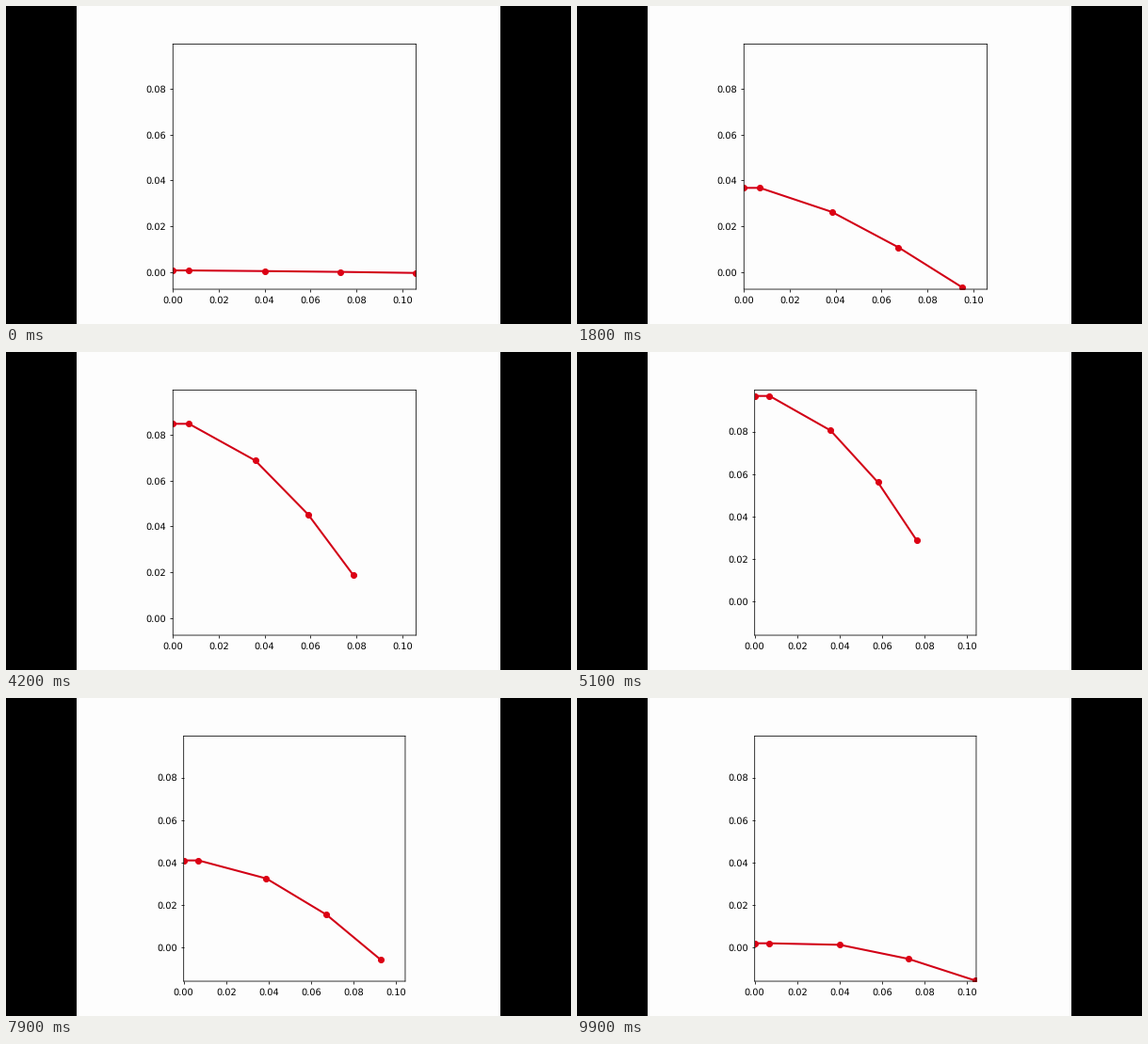
These frames come from a looping animation (600x338 px, 10000 ms). A matplotlib script:

```python
import numpy as np
import matplotlib.pyplot as plt
from matplotlib.animation import FuncAnimation
from matplotlib.patches import Rectangle
from matplotlib.ticker import MultipleLocator

W, H, DPI = 600, 338, 64
FRAMES, INTERVAL = 100, 100
HALF = FRAMES // 2
PAPER, LINE, DOT = "#fdfdfd", "#d20016", "#dc0014"

SCALE = H / 480                  # a 640 x 480 plot shrunk to the stage height
PT = SCALE * 100 / DPI           # point sizes after shrinking
MARGIN = 75                      # black bar on either side

BASE, LINK = 0.007, 0.033        # clamp length and link length
# A pose is the clamp height followed by the downward slope of each link.
PEAK = np.array([0.0988, 29.8, 47.6, 56.1])
START = np.array([0.0007, 0.5, 0.6, 0.8])
END = np.array([0, 0.6, 10.7, 17.0])
LIFT_BOW = np.array([0, 1.03, 0.90, 0.83])
DROP_BOW = np.array([-0.025, 0.33, 0.61, 0.75])


def blend(low, x, bow, skew):
    """Pose between low and PEAK, bowed away from a straight ramp."""
    ease = x + bow * x * (1 - x) * (1 + skew * (x - 0.5))
    return low + (PEAK - low) * ease


def chain(pose):
    height, angles = pose[0], np.radians(pose[1:])
    x = BASE + LINK * np.cumsum(np.cos(angles))
    y = height - LINK * np.cumsum(np.sin(angles))
    return np.r_[0, BASE, x], np.r_[height, height, y]


plt.rcParams.update({
    "font.family": "DejaVu Sans",
    "font.size": 10 * PT,
    "axes.linewidth": 0.8 * PT,
    "text.hinting": "none",
    "path.snap": False,
})

fig = plt.figure(figsize=(W / DPI, H / DPI), dpi=DPI, facecolor="black")
fig.add_artist(Rectangle((MARGIN / W, 0), 1 - 2 * MARGIN / W, 1,
                         color=PAPER, lw=0, zorder=-1))

ax = fig.add_axes([(MARGIN + 80.5 * SCALE) / W, 52.5 / 480,
                   496 * SCALE / W, 370 / 480], facecolor=PAPER)
ax.set_aspect("equal")
for axis in (ax.xaxis, ax.yaxis):
    axis.set_major_locator(MultipleLocator(0.02))
ax.tick_params(width=0.8 * PT, length=3.5 * PT, pad=3.5 * PT)
line, = ax.plot([], [], "o-", color=LINE, lw=2.1 * PT,
                ms=6.2 * PT, mew=PT, mfc=DOT, mec=DOT)


def update(i):
    if i < HALF:
        pose = blend(START, i / (HALF - 1), LIFT_BOW, -0.25)
        right, bottom = 0.106, -0.0075
    else:
        pose = blend(END, (FRAMES - i) / HALF, DROP_BOW, 1.43)
        right, bottom = 0.1042, -0.0159
    ax.set(xlim=(0, right), ylim=(bottom, 0.0995))
    line.set_data(*chain(pose))
    return line,


anim = FuncAnimation(fig, update, frames=FRAMES, interval=INTERVAL,
                     init_func=lambda: update(0), repeat=True,
                     repeat_delay=0, blit=False)
plt.show()
```
